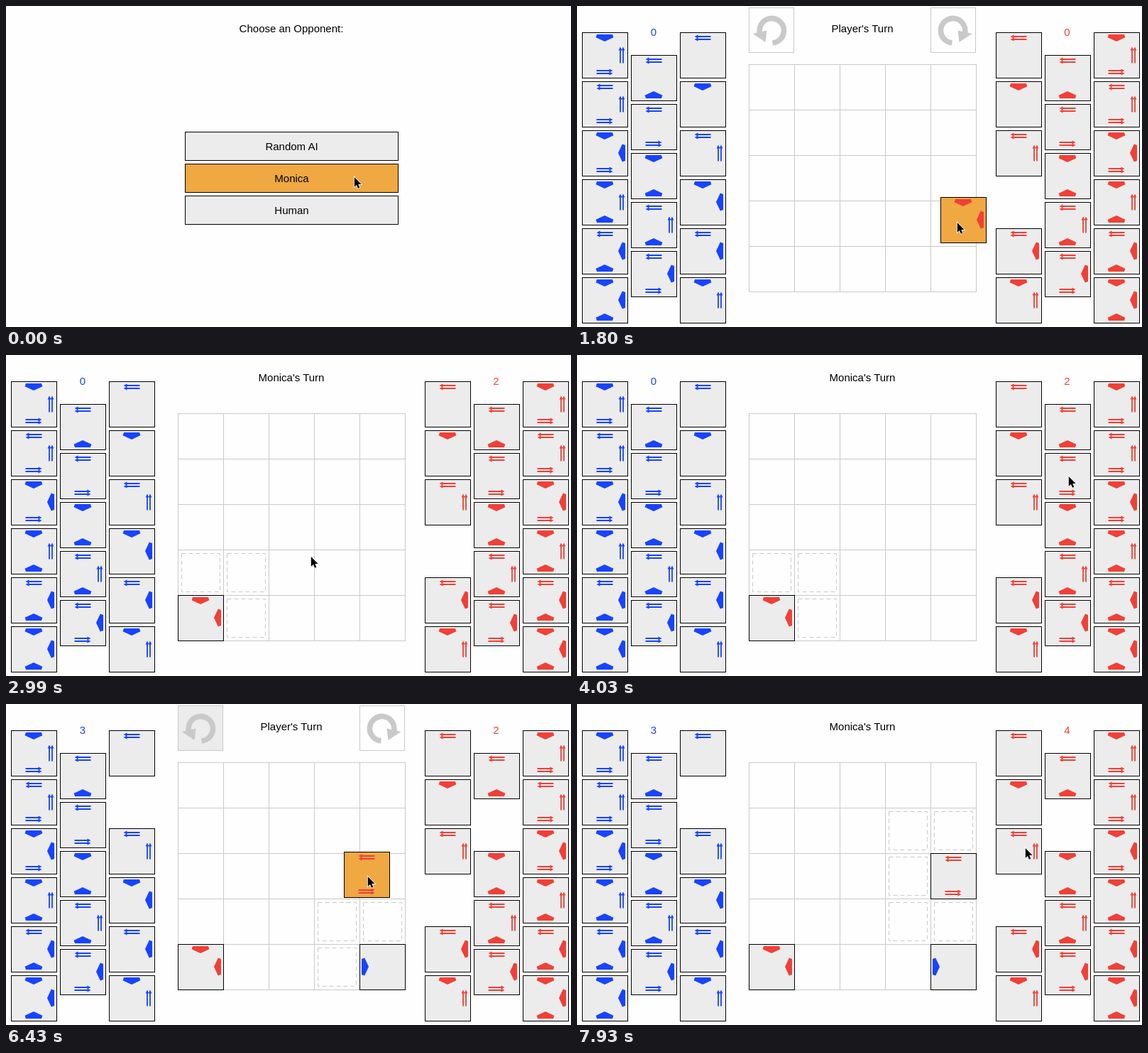
An HTML page for the animation above (8 s loop, 796 px wide and 452 px high).

```html
<!DOCTYPE html>
<html lang="en">
<head>
<meta charset="utf-8">
<title>Tile game</title>
<style>
  html, body { margin: 0; width: 100%; height: 100%; overflow: hidden; background: #fefefe; }
  svg { display: block; width: 796px; height: 452px; }
  text { font: 15px "Liberation Sans", Arial, Helvetica, sans-serif; text-anchor: middle; }
</style>
</head>
<body>
<svg id="stage" viewBox="0 0 796 452"></svg>
<script>
const LOOP = 8000;
// The game advances in held steps; all event times below count steps.
const STEP = 149.6, LEAD = 10;
const GAME_START = 5;

const BLUE = '#1744ff', RED = '#f04037', ORANGE = '#f0a843';
const GRAY = '#ececec', LINE = '#c9c9c9', PAPER = '#fefefe';
const CELL = 64, SIZE = 5, BOARD = { x: 242, y: 82 };
const PITCH = 69;
const stage = document.getElementById('stage');

function add(parent, tag, attrs, text) {
  const el = document.createElementNS('http://www.w3.org/2000/svg', tag);
  for (const k in attrs) el.setAttribute(k, attrs[k]);
  if (text !== undefined) el.textContent = text;
  parent.appendChild(el);
  return el;
}
const group = (parent = stage) => add(parent, 'g', {});
const box = (parent, x, y, w, h, fill, stroke, more) =>
  add(parent, 'rect', { x: x + .5, y: y + .5, width: w, height: h, fill, stroke, ...more });
const label = (parent, x, y, text, fill = '#000') => add(parent, 'text', { x, y, fill }, text);
const show = (el, on) => el.setAttribute('visibility', on ? 'visible' : 'hidden');
const moveTo = (el, x, y) => el.setAttribute('transform', `translate(${x} ${y})`);

// Edge marks for the top side; other sides are quarter turns of these.
const arrow = y => `M20.5 ${y}l5-2.4v1.5h18v1.8h-18v1.5Z`;
const MARKS = {
  P: 'M21 3H43L44.4 7.2 32 13 19.6 7.2Z',
  A: arrow(6) + arrow(10)
};

// Edges are listed as top, right, bottom, left.
function tile(parent, x, y, edges, color) {
  const g = group(parent);
  moveTo(g, x, y);
  g.face = box(g, 0, 0, CELL, CELL, GRAY, '#000');
  [...edges].forEach((e, i) => {
    if (MARKS[e]) add(g, 'path', { d: MARKS[e], fill: color, transform: `rotate(${i * 90} 32 32)` });
  });
  return g;
}

const COLUMNS = ['PAA AAA PPA PAP APP PPP', 'A-P A-A P-P AAP APA', 'A P AA PP AP PA']
  .map(column => column.split(' '));

const hand = (parent, left, columns, color) => columns.map((column, c) =>
  column.map((edges, r) =>
    tile(parent, left + PITCH * c, (c === 1 ? 69 : 37) + PITCH * r, edges, color)));

// Opponent menu
const menu = group();
label(menu, 402, 37, 'Choose an Opponent:');
['Random AI', 'Monica', 'Human'].forEach((name, i) => {
  box(menu, 252, 177 + 45 * i, 300, 40, i === 1 ? ORANGE : GRAY, '#000');
  label(menu, 402.5, 203 + 45 * i, name);
});

// Game
const game = group();
const title = label(game, 402, 37, '');
const scores = { [BLUE]: label(game, 108, 42, '0', BLUE), [RED]: label(game, 690.5, 42, '0', RED) };

for (let i = 0; i <= SIZE; i++) {
  const d = i * CELL + .5;
  add(game, 'path', {
    d: `M${BOARD.x + d} ${BOARD.y}v321M${BOARD.x} ${BOARD.y + d}h321`, stroke: LINE
  });
}

function turnButton(parent) {
  const face = box(parent, 242, 2, 63, 63, PAPER, LINE);
  add(parent, 'path', {
    d: 'M257.7 39A17.2 17.2 0 1 1 275.5 51.8', fill: 'none', stroke: LINE, 'stroke-width': 7.6
  });
  add(parent, 'path', { d: 'M247.5 39L267.5 34.5 265.5 51Z', fill: LINE });
  return face;
}
const buttons = group(game);
const undoFace = turnButton(buttons);
turnButton(add(buttons, 'g', { transform: 'translate(804 0) scale(-1 1)' }));

const blueHand = hand(game, 7, COLUMNS, BLUE);
const redHand = hand(game, 590, [...COLUMNS].reverse(), RED);

const cellX = c => BOARD.x + c * CELL, cellY = r => BOARD.y + r * CELL;
const onBoard = n => n >= 0 && n < SIZE;

// Dashed outlines in the cells around a placed tile.
function neighbours([col, row]) {
  const g = group(game);
  for (let c = col - 1; c <= col + 1; c++)
    for (let r = row - 1; r <= row + 1; r++)
      if (onBoard(c) && onBoard(r) && (c !== col || r !== row))
        box(g, cellX(c) + 5, cellY(r) + 5, 54, 54, 'none', LINE, { 'stroke-dasharray': '6 4' });
  return g;
}

// Each move: picked up, dropped in a cell, then the turn ends. Grip is the pointer's place on the tile.
const moves = [
  { color: RED, edges: 'PP', home: redHand[0][3], cell: [0, 4], points: 2,
    grip: [23, 35], pick: 12, drop: 17, end: 20 },
  { color: BLUE, edges: '---P', home: blueHand[2][1], cell: [4, 4], points: 3,
    pick: 30, drop: 30, end: 31 },
  { color: RED, edges: 'A-A', home: redHand[1][1], cell: [4, 2], points: 2,
    grip: [33, 34], pick: 41, drop: 46, end: 51 }
];
for (const m of moves) m.zone = neighbours(m.cell);
for (const m of moves) m.el = tile(game, cellX(m.cell[0]), cellY(m.cell[1]), m.edges, m.color);

// Pointer
const pointer = group();
const ARROW = 'M.8 1V14.8L3.9 12 6 16.8 8.3 15.8 6.2 11.1H10.6Z';
add(pointer, 'path', { d: ARROW, opacity: .2, transform: 'translate(.8 1.2)' });
add(pointer, 'path', { d: ARROW, stroke: '#fff', 'stroke-width': 1.6, 'paint-order': 'stroke' });

// Pointer strokes: first step, last step, destination. It rests in between.
const REST = [490, 240];
const STROKES = [
  [7, 11, 613, 279], [11, 15, 302, 378], [15, 17, 279, 382],
  [18, 20, 429, 283], [20, 22, 699, 205], [23, 27, 692, 170], [34, 35, 692, 171],
  [40, 43, 509, 242], [43, 47, 530, 246], [50, 53, 631, 202]
];

function pointerAt(step) {
  let [x, y] = REST;
  for (const [from, to, toX, toY] of STROKES) {
    const p = Math.min(1, Math.max(0, (step - from) / (to - from)));
    x += (toX - x) * p;
    y += (toY - y) * p;
  }
  return [Math.round(x), Math.round(y)];
}

function render(t) {
  const step = Math.floor((t + LEAD) / STEP);
  const playing = step >= GAME_START;
  menu.style.display = playing ? 'none' : '';
  game.style.display = playing ? '' : 'none';

  const [px, py] = pointerAt(step);
  moveTo(pointer, px, py);

  const dropped = moves.filter(m => step >= m.drop);
  const ended = moves.filter(m => step >= m.end).length;
  const settled = dropped.length === ended;
  const playersTurn = ended % 2 === 0;

  title.textContent = playersTurn ? "Player's Turn" : "Monica's Turn";
  show(buttons, playersTurn && settled);
  undoFace.setAttribute('fill', ended ? GRAY : PAPER);
  for (const color in scores)
    scores[color].textContent = dropped.reduce((sum, m) => sum + (m.color === color ? m.points : 0), 0);

  moves.forEach((m, i) => {
    const picked = step >= m.pick, dragging = picked && step < m.drop;
    show(m.home, !picked);
    show(m.el, picked);
    show(m.zone, settled && i === ended - 1);
    m.el.face.setAttribute('fill', dragging ? ORANGE : GRAY);
    if (dragging) moveTo(m.el, px - m.grip[0], py - m.grip[1]);
    else moveTo(m.el, cellX(m.cell[0]), cellY(m.cell[1]));
  });
}

const start = performance.now();
function tick(now) {
  render(Math.max(0, now - start) % LOOP);
  requestAnimationFrame(tick);
}
render(0);
requestAnimationFrame(tick);
</script>
</body>
</html>
```
